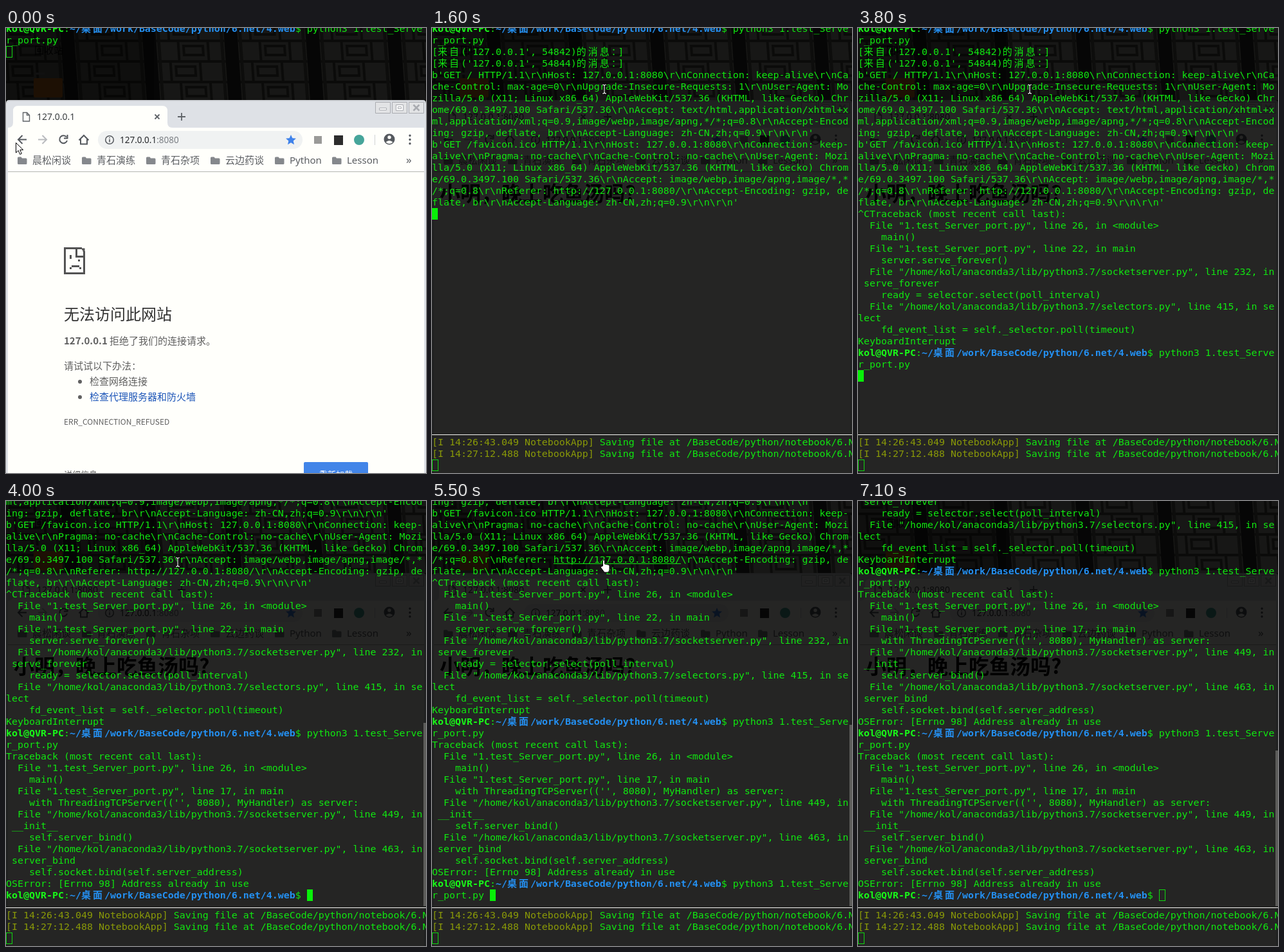
Animation, 653 px wide and 692 px high, one loop 7200 ms. Source, as an HTML page:

```html
<!DOCTYPE html>
<html lang="zh">
<head>
<meta charset="utf-8">
<title>Server port demo</title>
<style>
html, body { margin: 0; width: 100%; height: 100%; overflow: hidden; background: #000; }
#stage { position: relative; width: 653px; height: 692px; overflow: hidden; }
#stage > * { position: absolute; left: 0; top: 0; }
svg { display: block; }
#term { width: 653px; height: 692px; background: rgba(0,0,0,.855); z-index: 2; color: #10e810;
  font: 14.95px/18px "DejaVu Sans Mono", "Noto Sans CJK SC", monospace; overflow: hidden; }
#term div { position: absolute; left: 0; white-space: pre; }
#pane { top: 0; width: 653px; height: 632px; overflow: hidden; }
#rows { top: -8px; }
#rows p { margin: 0; height: 18px; }
#log { top: 635px; }
.w { letter-spacing: 3.05px; }
.user { color: #18fa18; font-weight: bold; }
.path { color: #2490f2; font-weight: bold; }
.time { color: #8a9a08; }
#term .caret { width: 9px; height: 18px; background: #08f008; box-sizing: border-box; }
#term .hollow { width: 10px; background: none; border: 1px solid #10d810; }
#split { top: 632px; width: 653px; height: 1px; background: #f4f4f0; }
#thumb { width: 4px; margin-left: 649px; background: #5c5c5a; }
#link { top: 97px; margin-left: 189px; width: 198px; height: 1px; background: #10e810; }
#browser { z-index: 1; }
#browser text { font-family: "Noto Sans", "Noto Sans CJK SC", sans-serif; }
#browser .page text { font-family: "Noto Sans CJK SC", sans-serif; }
#pointer { z-index: 9; overflow: visible; }
</style>
</head>
<body>
<div id="stage">
  <svg id="desk" width="653" height="692"></svg>
  <div id="term">
    <div id="pane"><div id="rows"></div><div id="caret" class="caret"></div><div id="link"></div><div id="thumb"></div></div>
    <div id="split"></div>
    <div id="log"><span class="time">[I 14:26:43.049 NotebookApp]</span> Saving file at /BaseCode/python/notebook/6.Net
<span class="time">[I 14:27:12.488 NotebookApp]</span> Saving file at /BaseCode/python/notebook/6.Net</div>
    <div class="caret hollow" style="top:671px"></div>
  </div>
  <svg id="browser" width="653" height="692">
    <path d="M0 692V117q0-5 5-5H648q5 0 5 5V692z" fill="#dee1e6"/>
    <path d="M1 117q0-4 5-4H648q4 0 4 4" fill="none" stroke="#c4c6ca"/>
    <path d="M3 155H650V692H3z" fill="#fffffb"/>
    <path d="M3 155q8 0 8-8V129q0-8 8-8H243q8 0 8 8V147q0 8 8 8z" fill="#fffffb"/>
    <g fill="none" stroke="#5f6368" stroke-width="1.4">
      <path d="M26.5 131.5h6l4 4v9.5h-10zM32.5 131.5v4h4"/>
      <path d="M231.500 134.500l7 7m0-7l-7 7M267 138h12m-6-6v12" stroke-width="1.8"/>
    </g>
    <text id="tab" x="48" y="143" font-size="14" fill="#3c4043"></text>
    <g fill="#e2e3e5" stroke="#a9abb0">
      <path d="M574.500 115.500h23v17h-23zM600.500 115.500h23v17h-23zM626.500 115.500h23v17h-23z"/>
      <path d="M580.500 124.500h11v3h-11zM606.500 119.500h11v9h-11zM609.500 122.500h5v3h-5z" fill="#fff"/>
      <path d="M633.500 119.500l9 9m0-9l-9 9" stroke-width="2.500"/>
    </g>
    <g fill="none" stroke="#55595e" stroke-width="2">
      <path d="M32 173.500H19m6.500-6.500l-6.500 6.500l6.500 6.500"/>
      <path d="M50 173.500h13m-6.500-6.500l6.500 6.500l-6.500 6.500" stroke="#b9bbbe"/>
      <path d="M94 169.500a6 6 0 1 0 1 5.500M95.500 166v5.500h-5.500"/>
      <path d="M113.500 174.500l7.500-7.500l7.500 7.500M116 173v7.500h10V173"/>
    </g>
    <rect x="143" y="160" width="318" height="28" rx="14" fill="#f0f2f2"/>
    <circle cx="161" cy="174" r="6.300" fill="none" stroke="#55595e" stroke-width="1.500"/>
    <path d="M161 173v4.500m0-7.500v1.600" stroke="#55595e" stroke-width="1.600"/>
    <text x="177" y="179" font-size="13.500" fill="#27292c">127.0.0.1<tspan fill="#7b7f84">:8080</tspan></text>
    <path d="M443 166l2.300 5.300l5.700.500l-4.300 3.800l1.300 5.600l-5-3l-5 3l1.300-5.600l-4.300-3.800l5.700-.500z" fill="#3f82ea"/>
    <rect x="479" y="168" width="12" height="12" fill="#9a9a98"/>
    <rect x="510" y="167" width="14" height="15" fill="#2c2c2c"/>
    <circle cx="549" cy="174" r="8" fill="#46a59a"/>
    <path d="M573.500 166v16" stroke="#d0d2d4"/>
    <circle cx="596" cy="173" r="8.500" fill="#55595e"/>
    <circle cx="596" cy="170" r="2.700" fill="#fffffb"/>
    <path d="M590.500 177.500q5.500-5 11 0q-5.500 5-11 0z" fill="#fffffb"/>
    <path d="M628 167.200h.01m-.01 6.300h.01m-.01 6.300h.01" stroke="#55595e" stroke-width="3.400" stroke-linecap="round"/>
    <g id="marks" font-size="15" fill="#5b5e62"></g>
    <path d="M3 223.500H650" stroke="#b4b6b4"/>
    <g id="error" class="page" font-size="15" fill="#606060">
      <path d="M118 342.500H91.500V381.500H121.500V347M109.500 342.500V355.500H121M118 344h3v4" fill="none" stroke="#535353" stroke-width="3"/>
      <path d="M99 353h3v6h-3zM112 360h3v3h-3zM102 369h12v3h-12zM99 372h3v3h-3zM114 372h3v3h-3z" fill="#535353"/>
      <text x="90" y="454" font-size="24" fill="#333">无法访问此网站</text>
      <text x="90" y="492"><tspan font-weight="bold">127.0.0.1</tspan> 拒绝了我们的连接请求。</text>
      <text x="90" y="531">请试试以下办法：</text>
      <circle cx="115" cy="550" r="3"/><circle cx="115" cy="574" r="3"/>
      <text x="130" y="555">检查网络连接</text>
      <text x="130" y="579" fill="#1c55b8">检查代理服务器和防火墙</text>
      <text x="90" y="617" font-size="12">ERR_CONNECTION_REFUSED</text>
      <text x="90" y="699" font-size="13">详细信息</text>
      <rect x="463" y="675" width="100" height="34" rx="2" fill="#4285e8"/>
      <text x="487" y="699" font-size="13" fill="#fff">重新加载</text>
    </g>
    <g id="hello" class="page"><text x="12" y="269" font-size="32" font-weight="bold">小明，晚上吃鱼汤吗?</text></g>
  </svg>
  <svg id="pointer" width="1" height="1">
    <path id="arrow" d="M.500 .500V16l3.700-3.500l2.500 6l2.600-1.100l-2.500-5.800h5z" fill="#fff" stroke="#000"/>
    <g id="beam" fill="none">
      <path d="M-4-7.500q4 0 4 2.500q0-2.500 4-2.500M0-5V5M-4 7.500q4 0 4-2.500q0 2.500 4 2.500" stroke="#000" stroke-width="2.600"/>
      <path d="M-3-7q3 0 3 2q0-2 3-2M0-5V5M-3 7q3 0 3-2q0 2 3 2" stroke="#fff" stroke-width="1.100"/>
    </g>
    <path id="hand" d="M-2.500 2V-6q1.500-3 3 0V-1l6 1.200q1.500.400 1.500 2V7q0 4-3 5H0L-5.500 4.500q0-2.500 2-2z" fill="#fff" stroke="#000"/>
  </svg>
</div>
<script>
const $ = id => document.getElementById(id);
const LOOP = 7200, COLS = 72, LAST_ROW = 34;

// Wallpaper: slanted lattice windows, trash and folder icons
function drawDesk() {
  let s = '<rect width="653" height="692" fill="#2b2b28"/>';
  for (let i = 0; i < 6; i++) {
    const x = -22 + i * 127;
    s += `<g transform="translate(${x} 0) skewX(4)"><rect width="106" height="112" fill="#a2a297"/>`;
    for (let r = 0; r < 4; r++) {
      const y = r * 32 - 12, dx = r % 2 * 14;
      s += `<path d="M0 ${y}H106M${20 + dx} ${y}v32M${66 + dx} ${y}v32M${28 + dx} ${y + 8}h30v14h-30z" fill="none" stroke="#4b4b44" stroke-width="4"/>`;
    }
    s += '<path d="M4 0V112M102 0V112" stroke="#5a5a52" stroke-width="5"/></g>';
  }
  s += '<rect width="230" height="112" fill="#000" opacity=".35"/>' +
    '<rect x="43" y="78" width="45" height="30" rx="2" fill="#c8701c"/><path d="M46 71h14" stroke="#777" stroke-width="3"/>' +
    '<text x="44" y="40" font-size="15" font-family="Noto Sans CJK SC, sans-serif">回收站</text>';
  $('desk').innerHTML = s;
}

function drawMarks() {
  const marks = [[18, '晨松闲谈'], [118, '青石演练'], [218, '青石杂项'], [318, '云边药谈'], [418, 'Python'], [507, 'Lesson']];
  $('marks').innerHTML = marks.map(([x, name]) =>
    `<path d="M${x} 202q0-1.500 1.500-1.500h4l1.500 2h6q1.500 0 1.500 1.500v6.500q0 1.500-1.500 1.500h-11.500q-1.500 0-1.500-1.500z" fill="#85888c"/>` +
    `<text x="${x + 23}" y="211">${name}</text>`).join('') + '<text x="622" y="211" font-size="17">»</text>';
}

// Terminal history
const CMD = Symbol('command');
const command = 'python3 1.test_Server_port.py ';
const agent = String.raw`User-Agent: Mozilla/5.0 (X11; Linux x86_64) AppleWebKit/537.36 (KHTML, like Gecko) Chrome/69.0.3497.100 Safari/537.36\r\n`;
const host = String.raw`HTTP/1.1\r\nHost: 127.0.0.1:8080\r\nConnection: keep-alive\r\n`;
const tail = String.raw`Accept-Encoding: gzip, deflate, br\r\nAccept-Language: zh-CN,zh;q=0.9\r\n\r\n'`;
const lib = (file, line, fn) => `  File "/home/kol/anaconda3/lib/python3.7/${file}.py", line ${line}, in ${fn}`;
const own = (line, fn) => `  File "1.test_Server_port.py", line ${line}, in ${fn}`;
const head = ['Traceback (most recent call last):', own(26, '<module>'), '    main()'];
const stopped = ['^C' + head[0], head[1], head[2],
  own(22, 'main'), '    server.serve_forever()',
  lib('socketserver', 232, 'serve_forever'), '    ready = selector.select(poll_interval)',
  lib('selectors', 415, 'select'), '    fd_event_list = self._selector.poll(timeout)',
  'KeyboardInterrupt'];
const inUse = [...head,
  own(17, 'main'), "    with ThreadingTCPServer(('', 8080), MyHandler) as server:",
  lib('socketserver', 449, '__init__'), '    self.server_bind()',
  lib('socketserver', 463, 'server_bind'), '    self.socket.bind(self.server_address)',
  'OSError: [Errno 98] Address already in use'];
const history = [CMD,
  "[来自('127.0.0.1', 54842)的消息：]", "[来自('127.0.0.1', 54844)的消息：]",
  String.raw`b'GET / ${host}Cache-Control: max-age=0\r\nUpgrade-Insecure-Requests: 1\r\n${agent}Accept: text/html,application/xhtml+xml,application/xml;q=0.9,image/webp,image/apng,*/*;q=0.8\r\n${tail}`,
  String.raw`b'GET /favicon.ico ${host}Pragma: no-cache\r\nCache-Control: no-cache\r\n${agent}Accept: image/webp,image/apng,image/*,*/*;q=0.8\r\nReferer: http://127.0.0.1:8080/\r\n${tail}`,
  ...stopped, CMD, ...inUse, CMD, ...inUse, CMD];

// time, entries shown, state of the last entry
const steps = [[0, 1, 'run'], [500, 5, 'run'], [2300, 16, 'prompt'], [3500, 16, 'typed'],
  [3800, 16, 'run'], [4000, 27, 'prompt'], [5500, 27, 'typed'], [6000, 38, 'prompt']];

const isWide = ch => ch > '\u2e80';
const cells = (text, cls = '') => [...text].map(ch => ({ ch, cls }));

function wrap(list) {
  const rows = [[]];
  let col = 0;
  for (const c of list) {
    const w = isWide(c.ch) ? 2 : 1;
    if (col + w > COLS) { rows.push([]); col = 0; }
    rows[rows.length - 1].push(c);
    col += w;
  }
  return { rows, col };
}

function rowHtml(row) {
  let html = '', key = null;
  for (const { ch, cls } of row) {
    const k = cls + (isWide(ch) ? ' w' : '');
    if (k !== key) { html += (key === null ? '' : '</span>') + `<span class="${k}">`; key = k; }
    html += ch === '<' ? '&lt;' : ch;
  }
  return `<p>${html}</span></p>`;
}

function layout([time, count, mode]) {
  const rows = [];
  let col = 0;
  history.slice(0, count).forEach((entry, i) => {
    const typed = i < count - 1 || mode !== 'prompt';
    const list = entry !== CMD ? cells(entry) : [
      ...cells('kol@QVR-PC', 'user'), ...cells(':'),
      ...cells('~/桌面/work/BaseCode/python/6.net/4.web', 'path'),
      ...cells('$ ' + (typed ? command : ''))];
    const part = wrap(list);
    rows.push(...part.rows);
    col = part.col;
  });
  const fresh = mode === 'run';
  const row = rows.length - (fresh ? 0 : 1), top = Math.max(0, row - LAST_ROW);
  return { time, html: rows.slice(top).map(rowHtml).join(''), x: (fresh ? 0 : col) * 9, y: (row - top) * 18 - 8 };
}
const screens = steps.map(layout);

const path = [[0, 15, 178], [300, 86, 172], [900, 86, 172], [1500, 268, 95], [1600, 268, 95],
  [1700, 267, 95], [5100, 267, 95], [5200, 268, 99], [5600, 268, 99], [5700, 269, 86], [6400, 269, 86], [6500, 271, 96], [LOOP, 271, 96]];

function pointerAt(t) {
  const i = path.findIndex(p => p[0] > t), [a, b] = [path[i - 1], path[i]];
  const k = (t - a[0]) / (b[0] - a[0]);
  return [a[1] + (b[1] - a[1]) * k, a[2] + (b[2] - a[2]) * k];
}

const within = (t, a, b) => t >= a && t < b;
const show = (id, on) => { $(id).style.display = on ? '' : 'none'; };
let shown = null;

function draw(now) {
  const t = Math.floor(now % LOOP / 100) * 100;
  const screen = screens.filter(s => s.time <= t).pop();
  if (screen !== shown) { $('rows').innerHTML = screen.html; shown = screen; }

  const caret = $('caret');
  caret.className = t < 1600 || t >= 7100 ? 'caret hollow' : 'caret';
  caret.style.left = screen.x + 'px';
  caret.style.top = screen.y + 'px';
  show('caret', !(within(t, 2900, 3200) || within(t, 4300, 4900) || within(t, 6300, 7000)));

  const top = t < 5500 ? 345 : t < 5700 ? 348 : t < 6000 ? 353 : 388;
  $('thumb').style.top = top + 'px';
  $('thumb').style.height = 630 - top + 'px';
  show('thumb', t >= 4000);
  show('link', within(t, 5500, 5700));

  $('browser').style.zIndex = t < 1600 ? 3 : 1;
  $('tab').textContent = t < 500 ? '127.0.0.1' : '127.0.0.1:8080';
  show('error', t < 500);
  show('hello', t >= 500);

  const [x, y] = pointerAt(t), hand = within(t, 5200, 5700), arrow = y > 112;
  $('pointer').style.transform = `translate(${Math.round(x)}px, ${Math.round(y)}px)`;
  show('arrow', arrow);
  show('hand', hand);
  show('beam', !arrow && !hand);
  show('pointer', t < 6600);
}

drawDesk();
drawMarks();
const start = performance.now();
function tick() {
  draw(performance.now() - start);
  requestAnimationFrame(tick);
}
tick();
</script>
</body>
</html>
```
